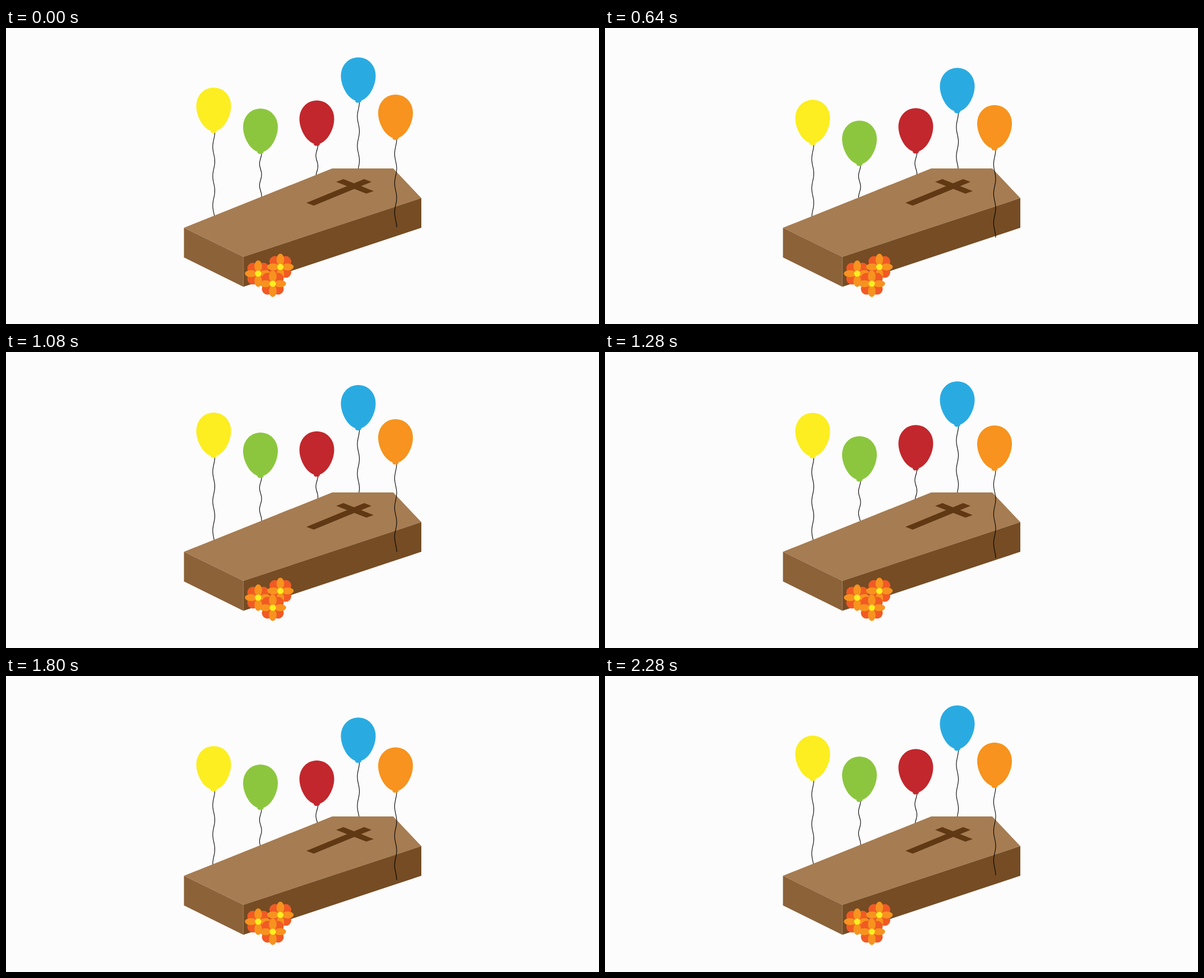
Recreate the animation shown at these times as an HTML page. Size 1058 px wide and 529 px high, loop 2320 ms.

```html
<!DOCTYPE html>
<html lang="en">
<head>
<meta charset="utf-8">
<title>Balloons</title>
<style>
  html, body { margin: 0; width: 100%; height: 100%; overflow: hidden; background: #fcfcfc; }
  svg { display: block; width: 100vw; height: 100vh; }
  .string { fill: none; stroke: #000; stroke-width: 1.1; }
</style>
</head>
<body>
<svg viewBox="0 0 1058 529">
  <defs>
    <g id="balloon">
      <path d="M0 0C17.5 0 31 14 31 33C31 53 16.5 78 0 78S-31 53 -31 33C-31 14 -17.5 0 0 0Z"/>
      <path d="M-4 75H4L5.6 78.5Q5 79.6 3.6 80V81H-3.6V80Q-5 79.6 -5.6 78.5Z"/>
    </g>
    <g id="flower">
      <g fill="#f15a24">
        <circle cx="-9.5" cy="-9.5" r="10"/><circle cx="9.5" cy="-9.5" r="10"/>
        <circle cx="-9.5" cy="9.5" r="10"/><circle cx="9.5" cy="9.5" r="10"/>
      </g>
      <g fill="#f7931e">
        <ellipse cx="-13" rx="10.7" ry="6.2"/><ellipse cx="13" rx="10.7" ry="6.2"/>
        <ellipse cy="-13" rx="6.8" ry="10.7"/><ellipse cy="13" rx="6.8" ry="10.7"/>
      </g>
      <circle r="5.6" fill="#fcee21"/>
    </g>
  </defs>
  <g id="back"></g>
  <path fill="#a67c52" d="M317.5 357L582 251H691L741 304L423.5 409Z"/>
  <path fill="#8c6239" d="M317.5 357L423.5 409V462.5L317.5 410Z"/>
  <path fill="#754c24" d="M423.5 409L741 304V357L423.5 462.5Z"/>
  <path fill="#603813" d="M536 312.5L639 270L652 275L549 317.5ZM589 275L602 270L656 291.5L643 296Z"/>
  <use href="#flower" x="450" y="439"/>
  <use href="#flower" x="489.5" y="427"/>
  <use href="#flower" x="476" y="457"/>
  <g id="front"></g>
</svg>
<script>
const LOOP = 2320, STEP = 40, BOB = 1000, DROP = 22;

// x, resting top, colour, start delay, length of one string wave, layer
const balloons = [
  [370.5, 106.5, '#fcee21', 174, 52.5, 'back'],
  [454, 144, '#8cc63f', 96, 38.5, 'back'],
  [554.5, 129.5, '#c1272d', 348, 38, 'back'],
  [628.5, 52.5, '#29abe2', 264, 52.5, 'back'],
  [695, 119, '#f7931e', 12, 52.5, 'front']
].map(([x, top, fill, delay, wave, layer]) => {
  const g = add(document.getElementById(layer), 'g', {});
  add(g, 'path', { class: 'string', d: stringPath(wave) });
  add(g, 'use', { href: '#balloon', fill });
  return { g, x, top, delay };
});

function add(parent, tag, attrs) {
  const el = document.createElementNS('http://www.w3.org/2000/svg', tag);
  for (const name in attrs) el.setAttribute(name, attrs[name]);
  return parent.appendChild(el);
}

function stringPath(wave) {
  let d = '';
  for (let y = 0; y <= wave * 3; y += 1.5) {
    const x = 0.2 + 1.8 * Math.cos(y / wave * 2 * Math.PI);
    d += (d ? 'L' : 'M') + x.toFixed(2) + ' ' + (79.5 + y);
  }
  return d;
}

// Two sine bobs after the delay, at rest otherwise
function dip(t) {
  return t < 0 || t > 2 * BOB ? 0 : DROP * (1 - Math.cos(t / BOB * 2 * Math.PI)) / 2;
}

function draw(now) {
  const t = Math.floor((now % LOOP) / STEP) * STEP;
  for (const b of balloons)
    b.g.setAttribute('transform', `translate(${b.x} ${b.top + dip(t - b.delay)})`);
}

const start = performance.now();
function tick() {
  draw(performance.now() - start);
  requestAnimationFrame(tick);
}
tick();
</script>
</body>
</html>
```
